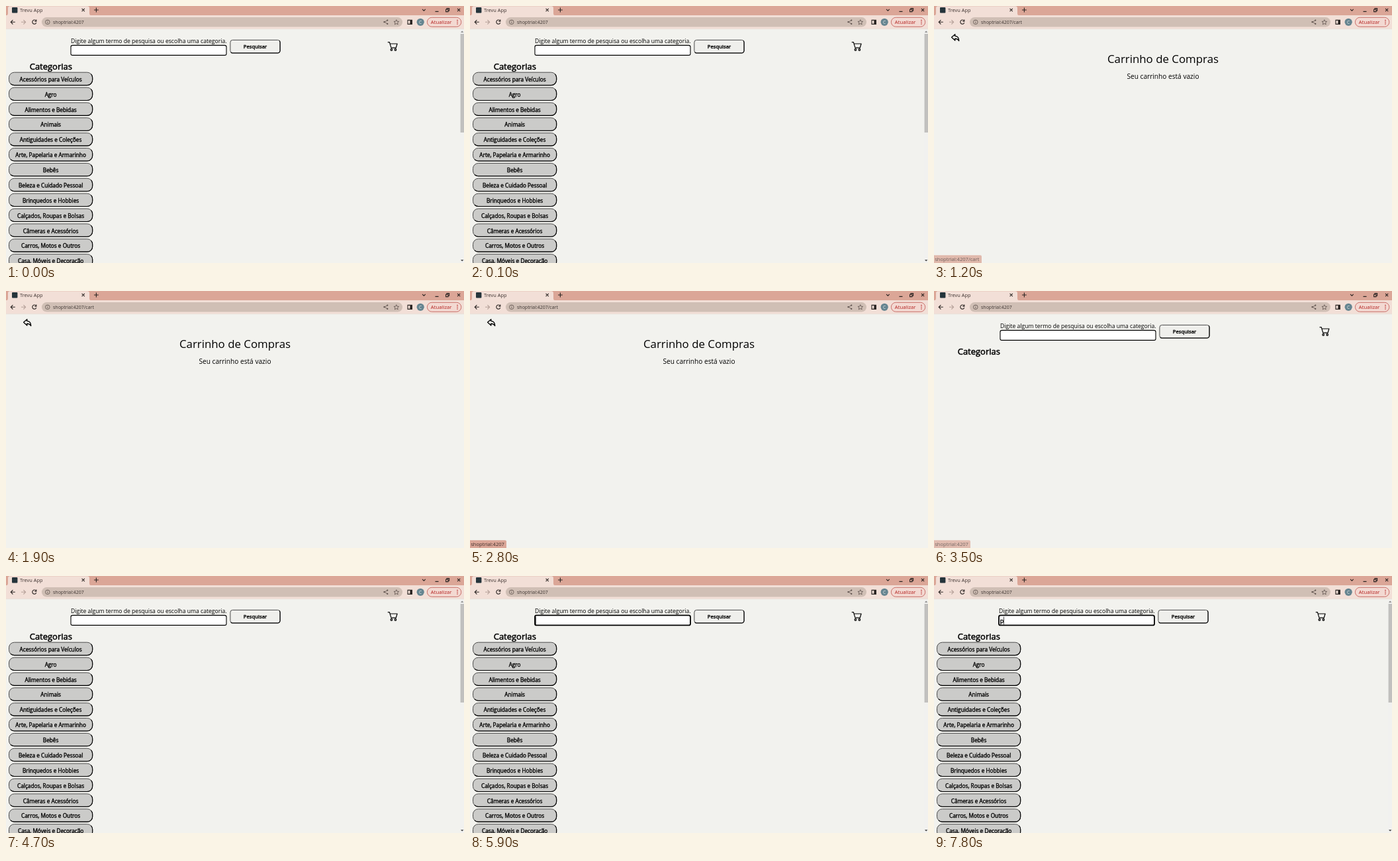
Animation of 692 by 388 pixels, one loop 8000 ms. Source, as an HTML page:

```html
<!DOCTYPE html>
<html lang="pt-BR">
<head>
<meta charset="utf-8">
<title>Loja</title>
<style>
html, body { margin: 0; width: 100%; height: 100%; overflow: hidden; background: #f2f2ee; }
svg { display: block; width: 692px; height: 388px; }
text { font-family: "Open Sans", "Noto Sans", sans-serif; }
.bold { stroke: #000; stroke-width: .35; }
.line { fill: none; stroke: #2b2523; stroke-width: 1.1; }
.ink { fill: none; stroke: #000; stroke-width: 1.2; stroke-linejoin: round; }
</style>
</head>
<body>
<svg id="stage" viewBox="0 0 692 388" xmlns="http://www.w3.org/2000/svg">
  <rect width="692" height="388" fill="#f2f2ee"/>

  <g id="home">
    <g id="search">
      <text x="98" y="56" font-size="8.63">Digite algum termo de pesquisa ou escolha uma categoria.</text>
      <rect id="field" x="98" y="59.4" width="235" height="15" rx="2.5" fill="#fff" stroke="#000"/>
      <text id="typed" class="bold" x="99.7" y="71" font-size="9">p</text>
      <rect id="caret" y="61.5" width=".7" height="12"/>
      <g id="submit"></g>
      <text class="bold" x="376.5" y="64" font-size="7.8" text-anchor="middle">Pesquisar</text>
    </g>
    <g id="cart" class="ink">
      <path d="M576.8 54.6h2.6l2.6 8.6h7.2l1.9-6.2h-11"/>
      <circle cx="582.4" cy="66" r="1.3"/>
      <circle cx="588.4" cy="66" r="1.3"/>
    </g>
    <text class="bold" x="67.8" y="95.6" font-size="12.97" text-anchor="middle" style="stroke-width:.5">Categorias</text>
    <g id="list">
      <rect x="686" y="35" width="6" height="353" fill="#f1f1ef"/>
      <rect x="686.6" y="42" width="5.4" height="149" fill="#c1c0be"/>
      <path d="M687 40l2.2-2.6 2.2 2.6z" fill="#8a8a88"/>
      <path d="M687 383l2.2 2.6 2.2-2.6z" fill="#505050"/>
    </g>
  </g>

  <g id="basket">
    <path class="ink" style="stroke-width:1.4" d="M26.6 47.2l5.2-4.5v2.7c3.9.2 5.9 2.7 5.9 7.2c-1.5-2.5-3.1-3.4-5.9-3.4v2.8z"/>
    <text x="346" y="85.5" font-size="16.85" text-anchor="middle">Carrinho de Compras</text>
    <text x="346" y="110.3" font-size="10.13" text-anchor="middle">Seu carrinho está vazio</text>
  </g>

  <g id="browser">
    <rect width="692" height="15" fill="#dba697"/>
    <rect y="14" width="692" height="20.5" fill="#f2dfd7"/>
    <path d="M0 14.2q3 0 3-3v-8q0-3 3-3h117q3 0 3 3v8q0 3 3 3z" fill="#f2dfd7"/>
    <path d="M0 34.7h692" stroke="#e0d2cb" stroke-width=".5"/>
    <rect x="9" y="2" width="8.4" height="8.4" rx="1" fill="#25343b"/>
    <text x="21" y="8.9" font-size="7.4" fill="#3b302d">Trevu App</text>
    <path class="line" d="M114.6 3.9l4.2 4.2m0-4.2l-4.2 4.2M133 6h6.8m-3.4-3.4v6.8"/>
    <path class="line" d="M629 4.8l2.4 2.4 2.4-2.4M648.5 8.4h5M682 3.9l4.2 4.2m0-4.2l-4.2 4.2"/>
    <path class="line" stroke-width=".8" d="M664.6 5.2h3.4v3.4h-3.4zM666 5v-1.4h3.6v3.6h-1.4"/>
    <path class="line" d="M13.8 24.3h-6.6m3.2-3.2l-3.2 3.2 3.2 3.2"/>
    <path class="line" style="stroke:#b5a098" d="M23 24.3h6.6m-3.2-3.2l3.2 3.2-3.2 3.2"/>
    <path class="line" d="M45.4 22.3a3.1 3.1 0 1 0 .4 3M45.8 20.6v2.6h-2.6"/>
    <rect x="54" y="17" width="545" height="14.6" rx="7.3" fill="#d0bfb5"/>
    <g class="line" style="stroke:#5c504b;stroke-width:.8">
      <circle cx="62.8" cy="24.3" r="3.3"/>
      <path d="M62.8 23.8v2.4m0-4.2v.9"/>
      <path d="M576.4 21.6l-4.6 2.6 4.6 2.7"/>
      <path d="M589.8 20.7l1.1 2.5 2.7.2-2 1.8.6 2.7-2.4-1.4-2.4 1.4.6-2.7-2-1.8 2.7-.2z"/>
    </g>
    <g fill="#5c504b">
      <circle cx="576.3" cy="21.6" r="1.1"/>
      <circle cx="571.5" cy="24.2" r="1.1"/>
      <circle cx="576.3" cy="26.9" r="1.1"/>
    </g>
    <path class="line" d="M607 21.4h6.4v6h-6.4z"/>
    <rect x="610.4" y="21.4" width="3" height="6" fill="#2b2523"/>
    <circle cx="626.2" cy="24.3" r="5.6" fill="#668590"/>
    <text x="626.2" y="26.8" font-size="6.6" fill="#e9eeee" text-anchor="middle">C</text>
    <rect x="636.4" y="17.3" width="51.4" height="14" rx="7" fill="#f3d9d2" stroke="#c5645e" stroke-width=".9"/>
    <text x="641.8" y="27.1" font-size="7.75" fill="#b3211f">Atualizar</text>
    <g fill="#b3211f">
      <circle cx="682" cy="21.6" r=".8"/>
      <circle cx="682" cy="24.3" r=".8"/>
      <circle cx="682" cy="27" r=".8"/>
    </g>
    <text id="address" x="71" y="27" font-size="7" fill="#3d3431"></text>
  </g>

  <g id="status">
    <path id="bubble" fill="#dba697"/>
    <text id="link" x="1.2" y="385" font-size="7.6" fill="#40302c"></text>
  </g>
</svg>
<script>
const LOOP = 8000;
const HOST = "shoptrial:4207";
const CATEGORIES = [
  "Acessórios para Veículos", "Agro", "Alimentos e Bebidas", "Animais",
  "Antiguidades e Coleções", "Arte, Papelaria e Armarinho", "Bebês",
  "Beleza e Cuidado Pessoal", "Brinquedos e Hobbies", "Calçados, Roupas e Bolsas",
  "Câmeras e Acessórios", "Carros, Motos e Outros", "Casa, Móveis e Decoração"
];
// [start time, opacity] of the link bubble
const FADES = [[0, 0], [1200, .75], [1300, .35], [1400, 0], [2700, .5], [2800, 1],
  [3500, .7], [3600, .35], [3700, 0]];

const $ = id => document.getElementById(id);
const show = (id, on) => $(id).setAttribute("display", on ? "inline" : "none");
const shift = (id, dx) => $(id).setAttribute("transform", `translate(${dx} 0)`);

function add(parent, tag, attrs, text = "") {
  const node = document.createElementNS("http://www.w3.org/2000/svg", tag);
  for (const key in attrs) node.setAttribute(key, attrs[key]);
  node.textContent = text;
  parent.append(node);
}

// Outset button: grey upper left edge, black lower right edge
function bevel(parent, x, y, w, h, r, fill) {
  add(parent, "rect", { x, y, width: w, height: h, rx: r, fill, stroke: "#4c4c4c" });
  const k = r * .29;
  add(parent, "path", {
    d: `M${x + w - k} ${y + k}A${r} ${r} 0 0 1 ${x + w} ${y + r}v${h - 2 * r}` +
       `a${r} ${r} 0 0 1 ${-r} ${r}H${x + r}A${r} ${r} 0 0 1 ${x + k} ${y + h - k}`,
    fill: "none", stroke: "#000", "stroke-width": 1.1
  });
}

bevel($("submit"), 338.9, 51.4, 75.2, 19.6, 3.5, "#efefec");
CATEGORIES.forEach((name, i) => {
  const y = 100.2 + i * 22.87;
  bevel($("list"), 4.5, y, 126.2, 19.4, 8, "#cbcbc9");
  add($("list"), "text", {
    class: "bold", x: 67.6, y: y + 13.6, "font-size": 8.26, "text-anchor": "middle"
  }, name);
});

function render(t) {
  const home = t < 1200 || t >= 3400;
  const loaded = t < 1200 || t >= 3700;
  const focused = t >= 5900;
  const typed = t >= 7800;

  show("home", home);
  show("basket", !home);
  show("list", loaded);
  shift("search", loaded ? 0 : 2);
  shift("cart", loaded ? 0 : 5.8);
  $("address").textContent = home ? HOST : HOST + "/cart";

  $("field").setAttribute("stroke-width", focused ? 1.8 : 1.1);
  show("typed", typed);
  show("caret", focused && (t < 6700 || t >= 7300));
  $("caret").setAttribute("x", typed ? 105.2 : 99.3);

  const toCart = t < 2000;
  const width = toCart ? 72 : 55;
  $("status").setAttribute("opacity", FADES.findLast(([start]) => t >= start)[1]);
  $("bubble").setAttribute("d", `M0 376.3h${width - 2}q2 0 2 2V388H0z`);
  $("link").textContent = toCart ? HOST + "/cart" : HOST;
}

function tick() {
  render(performance.now() % LOOP);
  requestAnimationFrame(tick);
}
tick();
</script>
</body>
</html>
```
